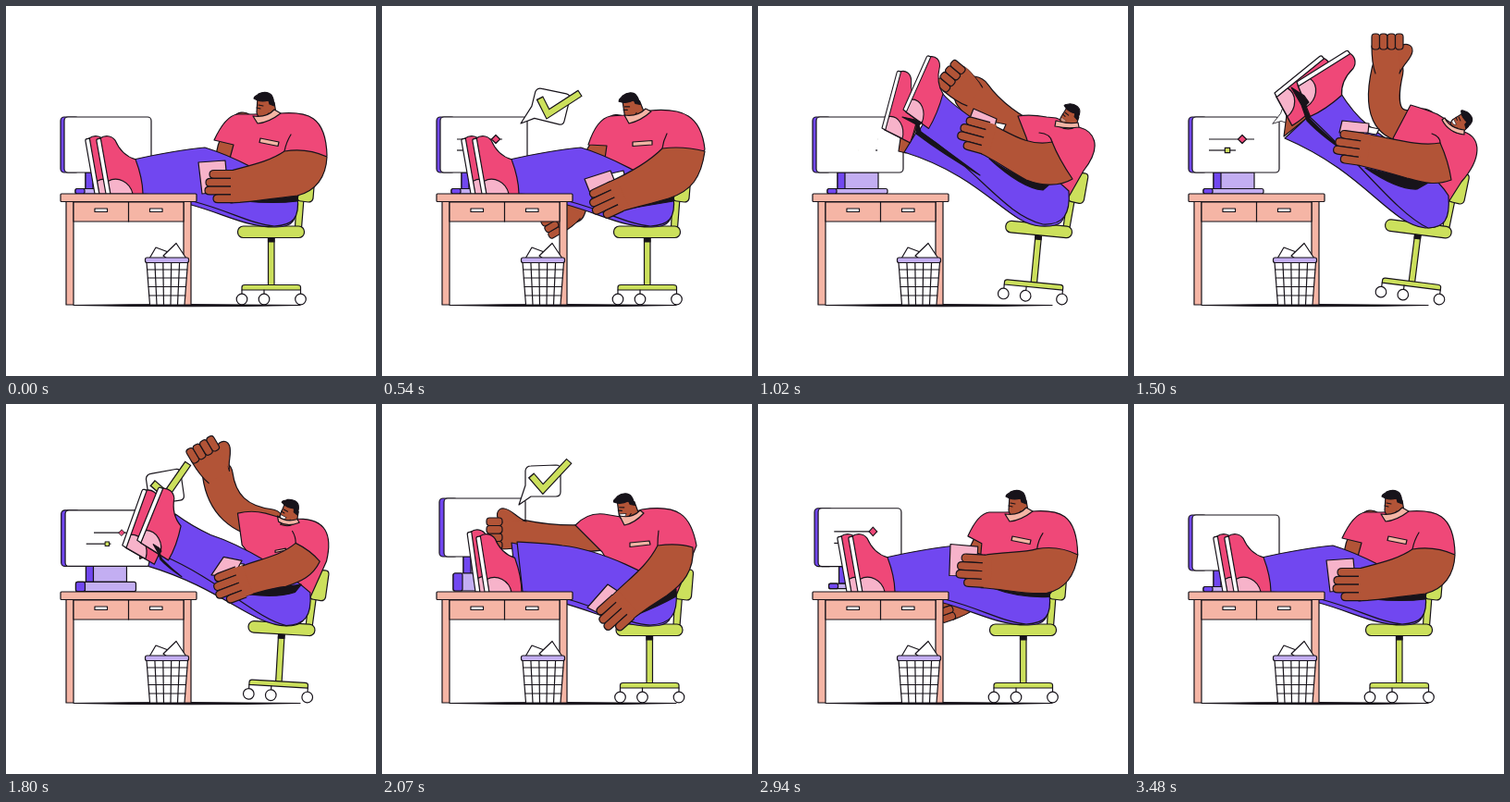
Animation, 400 px wide and 400 px high, one loop 3600 ms. Source, as an HTML page:

```html
<!DOCTYPE html>
<html lang="en">
<head>
<meta charset="utf-8">
<title>Feet on the desk</title>
<style>
html, body { margin: 0; width: 100%; height: 100%; overflow: hidden; background: #fff; }
svg { display: block; width: 100vw; height: 100vh; }
</style>
</head>
<body>
<svg id="stage" viewBox="0 0 400 400"></svg>
<script>
const INK = '#17131a', PINK = '#ef4878', SKIN = '#b25437', BLUE = '#7147f0', LILAC = '#c3aef2',
  LIME = '#cce05c', PEACH = '#f5b5a5', ROSE = '#f7b3ca', WHITE = '#fff';
const LOOP = 3600, STEP = 30, END = 3480;
const TIMES = [0, 540, 1020, 1500, 2070, 2580, END];
const NUM = /-?\d*\.?\d+/g;
const stage = document.getElementById('stage');

function add(parent, tag, attrs) {
  const el = document.createElementNS('http://www.w3.org/2000/svg', tag);
  for (const k in attrs) el.setAttribute(k, attrs[k]);
  parent.appendChild(el);
  return el;
}
const group = (parent = stage) => add(parent, 'g', {
  stroke: INK, 'stroke-width': 1.2, 'stroke-linejoin': 'round', 'stroke-linecap': 'round'
});
const path = (parent, fill, d = '') => add(parent, 'path', { fill, d });
const rect = (parent, fill, x, y, width, height, rx = 0) =>
  add(parent, 'rect', { fill, x, y, width, height, rx });

// Smooth keyframes without overshoot; an empty key repeats the first one.
function track(keys, times = TIMES) {
  const all = keys.map(k => k || keys[0]);
  if (all.length < times.length) all.push(keys[0]);
  const rows = all.map(k => k.match(NUM).map(Number));
  const text = keys[0].split(NUM);
  const slope = (i, j) => (rows[i + 1][j] - rows[i][j]) / (times[i + 1] - times[i]);
  const tangent = (i, j) => {
    if (i === 0 || i === rows.length - 1) return 0;
    const a = slope(i - 1, j), b = slope(i, j);
    return a * b > 0 ? 2 * a * b / (a + b) : 0;
  };
  const at = t => {
    let i = 0;
    while (i < times.length - 2 && t >= times[i + 1]) i++;
    const span = times[i + 1] - times[i];
    const u = Math.max(0, Math.min(1, (t - times[i]) / span)), v = 1 - u;
    return rows[i].map((p, j) => {
      const q = rows[i + 1][j];
      return p * v * v * (1 + 2 * u) + q * u * u * (3 - 2 * u)
        + span * u * v * (v * tangent(i, j) - u * tangent(i + 1, j));
    });
  };
  at.path = t => at(t).reduce((s, n, j) => s + n.toFixed(2) + text[j + 1], text[0]);
  return at;
}

const updates = [];
function morph(parent, fill, keys) {
  const el = path(parent, fill), tr = track(keys);
  updates.push(t => el.setAttribute('d', tr.path(t)));
  return el;
}
// Keys are "x y angle scaleX scaleY".
function pose(el, keys, times) {
  const tr = track(keys, times);
  updates.push(t => {
    const [x, y, a, sx, sy] = tr(t);
    el.setAttribute('transform', `translate(${x} ${y}) rotate(${a}) scale(${sx} ${sy})`);
  });
}
const clamp = x => Math.max(0, Math.min(1, x));
const ease = x => { x = clamp(x); return x * x * (3 - 2 * x); };
const set = (el, attrs) => { for (const k in attrs) el.setAttribute(k, attrs[k]); };

function makeMonitor() {
  const g = group();
  const neck = rect(g, LILAC, 0, 0, 44, 9), neckSide = rect(g, BLUE, 0, 0, 8, 9);
  const foot = rect(g, LILAC, 0, 0, 65, 6, 2), footSide = rect(g, BLUE, 0, 0, 10, 6, 2);
  const back = rect(g, BLUE, 0, 0, 20, 60, 4), face = rect(g, WHITE, 0, 0, 94, 60, 4);
  const ui = group(g);
  const lines = [24, 36].map(y => add(ui, 'line', { y1: y, y2: y, 'stroke-linecap': 'butt' }));
  const marks = [path(ui, PINK, 'M-4.5,0 L0,-4.5 4.5,0 0,4.5Z'), rect(ui, LIME, -2.7, -2.7, 5.4, 5.4)];
  const windows = [[0, 1060], [1080, 2040], [2130, 3460]];
  // left edge, face left, top, face width, height, foot x, foot y, foot height
  const tr = track([
    '59 63 120 94 60 75 197.5 5.5', '', '62 67 102 88 63 77 183 19',
    '67 71 92 78 71 81 184 6', '', ''
  ], [0, 1620, 2070, 2580, 3120, END]);
  updates.push(t => {
    const [x, fx, y, w, h, bx, by, bh] = tr(t);
    set(back, { x, y, height: h });
    set(face, { x: fx, y, width: w, height: h });
    for (const el of [neck, neckSide]) set(el, { x: bx + 11, y: y + h, height: Math.max(0, by - y - h) });
    for (const el of [foot, footSide]) set(el, { x: bx, y: by, height: bh });
    ui.setAttribute('transform', `translate(${fx} ${y}) scale(${w / 94} ${h / 60})`);
    const win = windows.find(([a, b]) => t > a && t < b);
    ui.setAttribute('visibility', win ? 'visible' : 'hidden');
    if (!win) return;
    const u = t - win[0], left = win[1] - t;
    [[67, 54], [47, 38]].forEach(([end, mark], i) => {
      const grow = ease((u - i * 60) / 320), out = 1 - ease((left - 30 + 30 * i) / 320);
      const x2 = 18 + (end - 18) * grow + (67 - end) * out;
      set(lines[i], { x1: 18 + (x2 - 18) * out, x2 });
      const m = Math.min(x2, mark + Math.min(8, Math.max(0, u - 420) * .05));
      marks[i].setAttribute('transform', `translate(${m} ${24 + 12 * i}) scale(${grow * (1 - out)})`);
    });
  });
}

function makeBubble() {
  const g = group();
  path(g, WHITE, 'M0,0 L7,-21 V-37 Q8,-42 13,-42 L40,-43 Q45,-43 45,-38 V-14 Q45,-9 40,-9 H13 Z');
  for (const [stroke, w, d] of [[INK, 8.4, 'M13,-32 L26,-17 54.5,-47.5'], [LIME, 6, 'M14,-31 L26,-17 53.8,-46.7']])
    set(path(g, 'none', d), { stroke, 'stroke-width': w, 'stroke-linecap': 'butt', 'stroke-linejoin': 'miter' });
  pose(g, [
    '150 127 -40 0 0', '', '150 127 -10 1.08 1.08', '150 127 14 1 1', '150 127 30 0 0',
    '150 127 30 0 0', '150 127 20 .62 .62', '150 122 -10 1 1', '148 109 0 1 1',
    '143 99 0 1.05 1.4', '142 100 0 1.05 1.32', '142 101 10 0 0', ''
  ], [0, 120, 360, 540, 720, 1380, 1500, 1700, 2070, 2400, 2580, 2700, END]);
}

function makeBackArm() {
  const g = group(), limb = [INK, SKIN].map(stroke => set2(path(g, 'none'), stroke));
  function set2(el, stroke) { el.setAttribute('stroke', stroke); return el; }
  const hand = group(g);
  path(hand, SKIN, 'M-13,3 C-17,-8 -17,-18 -17,-27 H17 C17,-18 17,-8 13,3');
  const thumb = path(hand, SKIN, 'M12,-23 C17,-32 28,-29 27,-21 C26,-13 18,-8 14,1');
  for (let i = 0; i < 4; i++) rect(hand, SKIN, -17 + 8.5 * i, -40, 8.5, 17, 3.4);
  // shoulder, bend, wrist, hand angle, thumb size, hand size, limb width
  const tr = track([
    '256 128 230 162 246 188 -90 .3 .9 26', '254 131 226 167 206 221 -120 .3 .9 27',
    '302 150 255 128 232 96 -50 .3 1 40', '312 128 258 140 274 70 0 1 1 34',
    '308 124 256 116 269 57 -4 1 1 34', '245 143 195 149 153 140 -90 1 1 29',
    '257 138 230 178 208 222 -120 .3 .95 27', ''
  ], [0, 540, 1020, 1500, 1640, 2070, 2580, END]);
  updates.push(t => {
    const [sx, sy, cx, cy, wx, wy, a, th, size, width] = tr(t);
    limb.forEach((el, i) => set(el, {
      d: `M${sx},${sy} Q${cx},${cy} ${wx},${wy}`, 'stroke-width': width + 1.2 - 2.4 * i
    }));
    hand.setAttribute('transform', `translate(${wx} ${wy}) rotate(${a}) scale(${size})`);
    thumb.setAttribute('transform', `translate(${14 - 14 * th} 0) scale(${th} 1)`);
  });
}

function makeChair() {
  const g = group();
  path(g, LIME, 'M314,208 L312.500,240 H319.500 L322,208Z');
  path(g, LIME, 'M319,183 Q320,179 324,179 H330 Q334,179 334,183 L332,208 Q331,212 327,212 L319,211 Q315,211 315,207Z');
  rect(g, LIME, 283.5, 250, 6.5, 52);
  rect(g, INK, 283.5, 250, 6.5, 5);
  path(g, LIME, 'M255,307 V304 Q255,301.500 258,301.500 H315 Q318.500,301.500 318.500,304 V307Z');
  for (const x of [255, 279, 318.5]) {
    add(g, 'line', { x1: x, x2: x, y1: 307, y2: 311 });
    add(g, 'circle', { cx: x, cy: 317, r: 5.8, fill: WHITE });
  }
  rect(g, LIME, 250.5, 238, 72, 12.5, 6);
  const tr = track(['0 0', '', '10 5.5', '11.5 7.2', '2.5 0', '']);
  updates.push(t => {
    const [dx, a] = tr(t);
    g.setAttribute('transform', `translate(${dx} 0) rotate(${a} 318 317)`);
  });
}

function makeShirt() {
  const g = group();
  morph(g, PINK, [
    'M225,145 Q237,119 250,117 L268,117 L297,116 C325,114 346,118 347,162 L316,205 L240,172 L246,150Z',
    'M223,150 Q232,122 247,119 L262,118 L290,113 C325,110 345,118 349,155 L316,205 L240,172 L243,151Z',
    'M281,119 Q295,117 312,120 L322,121 L347,131 C362,135 374,150 352,178 L335,208 L300,175 L290,142Z',
    'M299,107 Q316,112 328,117 L336,122 L357,136 C376,143 376,165 354,190 L340,212 L300,175 L280,143Z',
    'M209,131 Q222,117 240,119 L258,122 L281,114 C320,108 334,120 340,153 L318,207 L250,180 L238,160Z',
    'M228,140 Q238,118 250,117 L268,117 L297,116 C325,114 343,118 344,163 L316,205 L240,172 L239,152Z'
  ]);
  morph(g, PEACH, [
    'M275,143 L295,147 294,151.500 274,147.500Z', 'M271,147 L292,145.500 292,150 271,151.500Z',
    'M300,160 L300,160 300,160 300,160Z', 'M318,165 L318,165 318,165 318,165Z',
    'M268,150 L289,148 290,152 268,154.500Z', ''
  ]);
  morph(g, 'none', [
    'M308,139 Q303,147 301,157', 'M308,138 Q304,146 303,154', 'M304,137 Q316,138 318,147',
    'M322,138 Q331,141 331,148', 'M299,137 Q298,145 298,153', 'M308,140 Q303,147 302,156'
  ]);
}

function makeHead() {
  const g = group();
  path(g, SKIN, 'M-9,-21 L-10,-5 Q-9,1 -4,1 L-6,5 Q6,5 11,-4 L9,-16Z');
  path(g, INK, 'M-13,-20 C-13,-23 -9,-23 -8,-25 C-2,-28 5,-27 7,-22 C9,-18 8,-15 9,-12 L4,-14 L3,-18 Q-4,-16 -9,-18Z');
  path(g, 'none', 'M-8,-13 l5,1 M-10,-10 l4,1 M-6,1 Q0,0 3,-4');
  const smile = path(g, WHITE, 'M-9,-6 L-2,-5 Q-4,0 -9,-3Z');
  smile.setAttribute('stroke-width', .7);
  const grin = track(['0', '0', '.4', '1', '1', '0']);
  updates.push(t => smile.setAttribute('opacity', grin(t)[0]));
  pose(g, ['281 120 0 1 1', '273 120 -12 1 1', '333 129 28 .9 .9', '346 132 55 .85 .85', '267 123 -11 1 1', '']);
  morph(group(), PEACH, [
    'M267,119 Q282,121 290,112 L297,116 Q284,126 272,127Z',
    'M262,118 Q276,120 285,111 L291,114 Q280,124 267,127Z',
    'M322,124 Q336,128 346,126 L347,131 Q335,133 321,130Z',
    'M336,121 Q341,132 357,134 L357,139 Q340,137 333,123Z',
    'M257,121 Q270,124 279,115 L283,118 Q273,129 262,131Z', ''
  ]);
}

function makeShoe(keys) {
  const g = group();
  path(g, PINK, 'M4,-60 C10,-63 17,-61 20,-55 C23,-42 30,-35 38,-31 Q42,-10 39.4,7 L4,1Z');
  path(g, ROSE, 'M4.500,-13 C16,-17 28,-8 28.600,5 L4.500,1Z');
  path(g, WHITE, 'M0,0 V-58 Q0,-60 2,-60 H4.800 V1Z');
  pose(g, keys);
}

function makeLegs() {
  const far = group();
  morph(far, SKIN, [
    'M130,190 L125,172 L138,168 L146,190Z', '', 'M152,157 L155,136 L173,128 L160,159Z',
    'M162,141 L165,118 L188,108 L192,117Z', 'M130,190 L125,172 L138,168 L146,190Z', ''
  ]);
  morph(far, BLUE, [
    'M146,190 C170,172 190,167 215,160 C245,165 290,190 312,210 C316,232 310,239 292,239 C250,240 220,212 150,206Z', '',
    'M174,132 C200,150 230,170 250,185 C280,200 310,210 330,215 C335,235 325,239 305,238 C270,236 245,185 158,158Z',
    'M192,116 C215,135 240,160 260,180 C285,195 315,205 335,215 C338,238 330,240 315,240 C275,235 250,180 163,143Z',
    'M140,150 C160,154 190,160 215,165 C245,170 290,190 312,210 C316,234 310,240 292,240 C255,242 220,216 146,204Z', ''
  ]);
  makeShoe(['96 203 -10 1 1', '', '134 132 15 .85 1.07', '152 94 51 1 1.08', '101 203 -8 1 1.08', '']);
  morph(group(), BLUE, [
    'M138,166 C165,160 190,155 215,153 C245,162 290,185 315,205 C318,230 310,237 290,238 C258,236 216,205 146,203Z', '',
    'M199,94 C210,108 225,115 240,128 C265,150 310,175 336,200 C338,225 330,237 308,236 C265,225 240,178 174,135Z',
    'M222,92 C232,108 242,120 252,128 C280,150 325,180 340,205 C342,232 335,239 318,240 C285,225 245,170 189,119Z',
    'M146,149 C165,150 185,151 195,153 C240,158 290,185 318,203 C320,228 312,238 290,239 C258,238 216,206 152,203Z', ''
  ]);
  makeShoe(['108 203 -10 1 1', '', '157 112 24 .85 1.07', '176 82 58 1 1.08', '111 203 -9 1 1', '']);
  // gap between the legs when they are raised
  const flat = 'M150,206 L150,206 L150,206 L150,206 L150,206 Q150,206 150,206 Q150,206 150,206 L150,206Z';
  morph(group(), INK, [
    flat, flat,
    'M156,120 L170,123 L177,126 L174,129 L176,136 Q202,155 240,183 Q200,160 171,138 L171,128Z',
    'M170,88 L184,97 L189,104 L185,108 L190,122 Q210,143 238,164 Q204,142 187,124 L181,107Z',
    flat, flat
  ]);
}

function makeFrontArm() {
  const g = group();
  morph(g, INK, [
    'M258,211 Q290,207 316,203 L315,211 Q290,214 258,211Z', 'M262,220 Q290,211 316,204 L315,211 Q290,215 262,220Z',
    'M250,165 Q285,190 316,192 L308,199 Q285,197 250,165Z', 'M250,175 Q285,184 320,190 L306,198 Q285,199 250,175Z',
    'M275,228 Q300,210 318,200 L318,208 Q300,218 275,228Z', 'M250,192 Q290,203 316,201 L315,207 Q280,208 250,192Z'
  ]);
  morph(g, WHITE, [
    'M225,180 L235,180 235,190 225,190Z', 'M248,181 L261,178 263,186 250,188Z',
    'M253,125 L268,128 265,135 253,132Z', 'M251,130 L265,133 262,139 251,137Z',
    'M240,205 L248,205 248,212 240,212Z', 'M225,160 L232,160 232,170 225,170Z'
  ]);
  morph(g, ROSE, [
    'M208,169 L237,167 240,200 212,203Z', 'M219,187 L247,178 258,205 230,215Z',
    'M233,111 L258,122 255,134 228,124Z', 'M225,124 L254,127 253,137 222,137Z',
    'M244,195 L256,203 238,228 222,220Z', 'M208,142 L239,147 234,178 204,176Z'
  ]);
  morph(g, SKIN, [
    'M243,178 C265,172 285,168 301,157 Q325,153 347,163 C346,185 335,200 315,205 C290,208 265,212 243,213',
    'M244,191 C262,183 285,172 303,154 Q325,151 349,157 C345,185 335,200 310,208 C290,214 275,217 259,222',
    'M248,126 C268,134 290,153 318,147 Q325,165 340,187 C325,196 305,194 290,188 C275,180 255,166 240,159',
    'M246,138 C270,140 305,153 331,148 Q340,168 343,188 C325,195 310,190 295,186 C275,180 260,176 242,172',
    'M248,208 C265,190 285,178 298,153 Q320,150 336,155 C338,180 325,195 308,207 C295,215 282,224 270,233',
    'M243,156 C265,152 285,158 302,156 Q325,152 344,163 C340,185 330,200 310,204 C290,206 265,193 240,191'
  ]);
  const hand = group(g);
  [20, 24, 25, 16].forEach((len, i) =>
    path(hand, SKIN, `M-2,${-17.5 + 8.8 * i} h${-len} q-5,0 -5,4.400 q0,4.400 5,4.400 h${len}`));
  add(hand, 'rect', { x: -4, y: -16.5, width: 10, height: 33, fill: SKIN, stroke: 'none' });
  pose(hand, [
    '247 195 0 1 1', '255 205 -25 1 1', '248 143 15 1 1',
    '248 155 8 1 1', '262 218 -42 1 1', '246 173 5 1 1'
  ]);
}

function makeDesk() {
  const g = group();
  rect(g, PEACH, 65, 211, 8, 112);
  rect(g, PEACH, 192, 211, 8, 112);
  rect(g, PEACH, 73, 212, 119, 21);
  add(g, 'line', { x1: 132.5, x2: 132.5, y1: 212, y2: 233 });
  for (const x of [96, 155.5]) rect(g, WHITE, x, 219, 13.5, 3.5);
  rect(g, PEACH, 59, 203, 147, 8.5, 1);

  path(g, WHITE, 'M155,273 L162,261 L178,267 L186,273Z');
  path(g, WHITE, 'M170,270 L184,256.500 L195,273 H174Z');
  path(g, WHITE, 'M152,277 L155.500,323 H193 L196.500,277Z');
  for (const y of [285, 294, 303.5, 313]) {
    const k = (y - 277) / 46 * 3.5;
    add(g, 'line', { x1: 152 + k, x2: 196.5 - k, y1: y, y2: y });
  }
  for (let i = 1; i < 5; i++)
    add(g, 'line', { x1: 152 + 8.9 * i, x2: 155.5 + 7.5 * i, y1: 277, y2: 323 });
  rect(g, LILAC, 150.5, 272, 47, 5.5, 2);
}

path(group(), INK, 'M73,323.500 Q135,322.500 196,322.500 L318,323.500 Q200,326 73,323.500Z');
[makeMonitor, makeBubble, makeBackArm, makeChair, makeShirt, makeHead, makeLegs, makeFrontArm, makeDesk]
  .forEach(make => make());

function render(ms) {
  const t = Math.min(END, Math.floor(ms % LOOP / STEP) * STEP);
  updates.forEach(fn => fn(t));
}
let start;
function tick(now) {
  if (start === undefined) start = now;
  render(Math.max(0, now - start));
  requestAnimationFrame(tick);
}
render(0);
requestAnimationFrame(tick);
</script>
</body>
</html>
```
